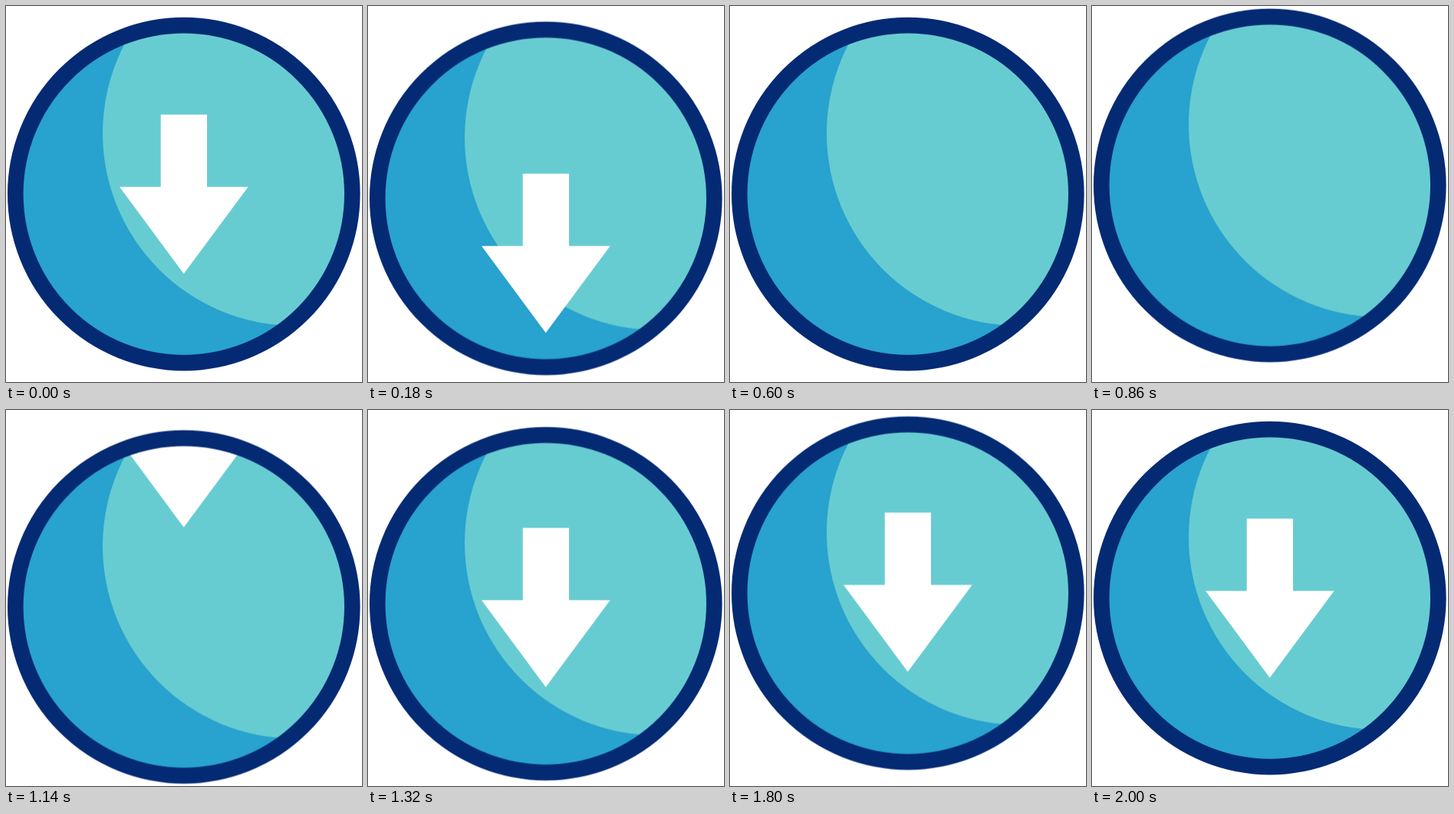
Animation, 464 px wide and 489 px high, one loop 2120 ms. Source, as an HTML page without scripts:

```html
<!DOCTYPE html>
<html lang="en">
<head>
<meta charset="utf-8">
<title>Download button</title>
<style>
  html, body {
    margin: 0;
    width: 100%;
    height: 100%;
    overflow: hidden;
    background: #fff;
  }
  svg {
    display: block;
    width: 464px;
    height: 489px;
  }
  .bob, .arrow {
    animation: bob 2120ms cubic-bezier(.333, 0, .667, 1) infinite;
  }
  .arrow {
    animation-name: drop;
  }
  @keyframes bob {
    0%, 94.34%, 100% { transform: translateY(0); }
    18.868%, 56.604% { transform: translateY(13px); }
    37.736%, 75.472% { transform: translateY(-12.9px); }
  }
  /* leaves below, re-enters from above, then settles just behind the badge */
  @keyframes drop {
    0%, 94.34%, 100% { transform: translateY(0); }
    30.425% { transform: translateY(400px); }
    30.426%, 47.358% { transform: translateY(-400px); }
    60.377% { transform: translateY(13px); }
    77.83% { transform: translateY(-12.9px); }
  }
</style>
</head>
<body>
<svg viewBox="0 0 464 489">
  <clipPath id="disc"><circle cx="231.8" cy="244.6" r="219"/></clipPath>
  <g class="bob">
    <g clip-path="url(#disc)">
      <circle cx="231.8" cy="244.6" r="219" fill="#28a2ce"/>
      <circle cx="376.2" cy="165.5" r="250.2" fill="#67ccd1"/>
    </g>
  </g>
  <path class="arrow" fill="#fff" d="M201.7 141.2H262V235.2H315.6L231.7 348.2L148 235.2H201.7Z"/>
  <g class="bob">
    <circle cx="231.8" cy="244.6" r="219.5" fill="none" stroke="#042a74" stroke-width="20.6"/>
  </g>
</svg>
</body>
</html>
```
